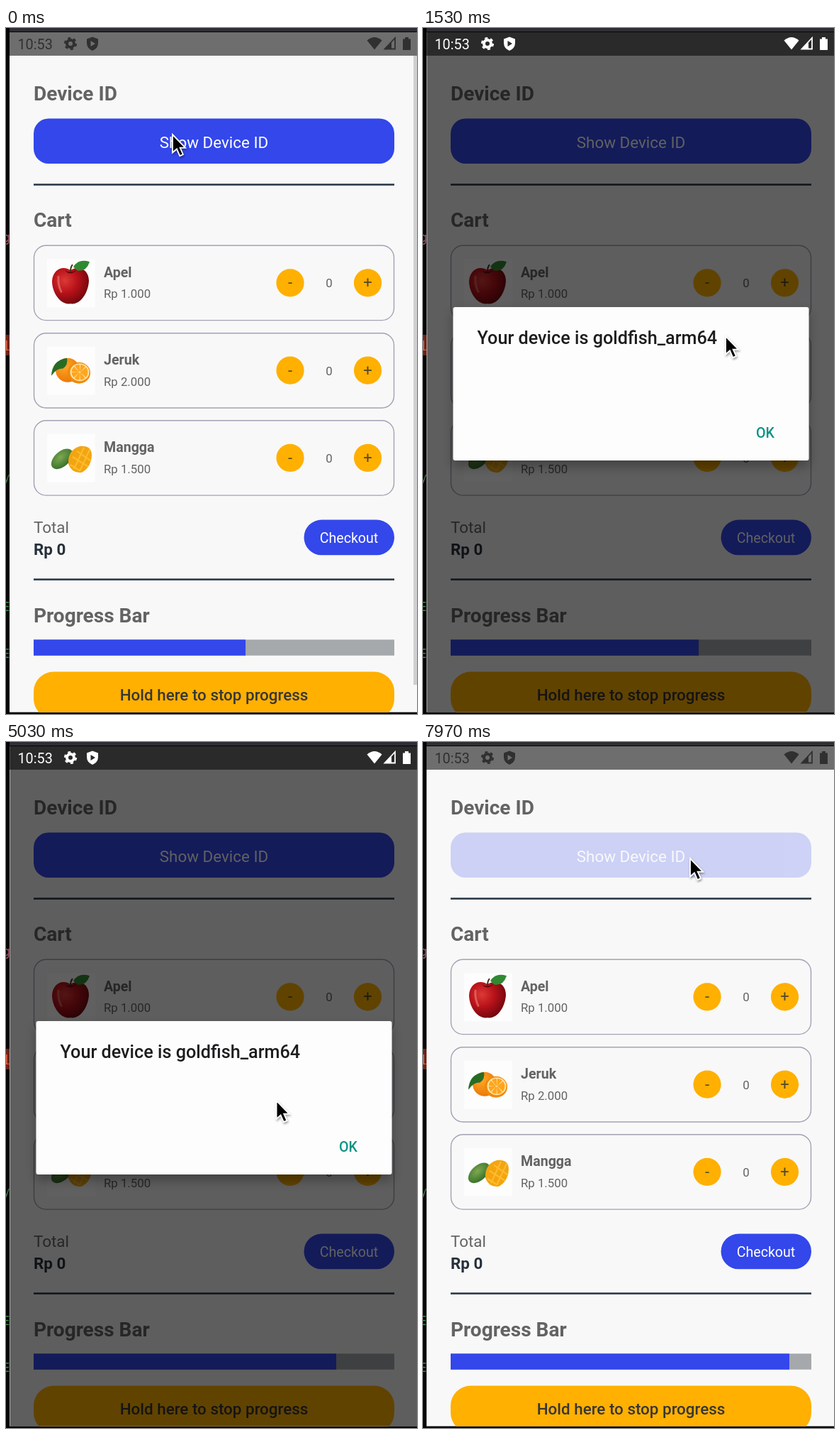
Write an HTML page that moves like this. It is 580 px wide and 966 px high and loops after 8 s.

```html
<!DOCTYPE html>
<html lang="id">
<head>
<meta charset="utf-8">
<title>Device and cart</title>
<style>
  html, body { margin: 0; width: 100%; height: 100%; overflow: hidden; background: #000; }
  svg { display: block; width: 100%; height: 100%; }
  text { font-family: Roboto, sans-serif; fill: #636363; white-space: pre; }
</style>
</head>
<body>
<svg id="stage" viewBox="0 0 580 966" preserveAspectRatio="none">
  <defs>
    <radialGradient id="red" cx=".35" cy=".35" r=".75">
      <stop offset="0" stop-color="#dc3a36"/><stop offset=".45" stop-color="#b8121a"/><stop offset="1" stop-color="#65050b"/>
    </radialGradient>
    <radialGradient id="orange" cx=".4" cy=".35" r=".7">
      <stop offset="0" stop-color="#ffa526"/><stop offset="1" stop-color="#e97605"/>
    </radialGradient>
    <radialGradient id="green" cx=".5" cy=".35" r=".7">
      <stop offset="0" stop-color="#7fa851"/><stop offset="1" stop-color="#2f6a26"/>
    </radialGradient>
    <filter id="shadow" x="-10%" y="-10%" width="120%" height="130%">
      <feDropShadow dx="0" dy="8" stdDeviation="8" flood-opacity=".3"/>
    </filter>
    <filter id="softShadow" x="-50%" y="-30%" width="200%" height="180%">
      <feDropShadow dx="1" dy="2" stdDeviation="1.5" flood-opacity=".4"/>
    </filter>
    <clipPath id="screen"><rect x="5" y="6" width="575" height="957.5"/></clipPath>
    <clipPath id="strip"><rect width="5" height="966"/></clipPath>
  </defs>

  <rect width="580" height="966" fill="#050505"/>
  <g id="editor" clip-path="url(#strip)"></g>
  <rect x="5" width="575" height="5" fill="#302e35"/>
  <g clip-path="url(#screen)">
    <rect x="5" y="6" width="575" height="960" fill="#f8f8f8"/>
    <rect x="5" y="6" width="575" height="33" fill="#6e6e6e"/>
    <rect id="scrollbar" x="575" y="39" width="5" height="886" fill="#cfcfd1"/>
    <g id="page"></g>
    <rect id="dim" x="5.500" y="6" width="575" height="960"/>
    <g id="status"></g>
    <g id="dialog">
      <rect x="42.500" y="393" width="502" height="216" rx="3" fill="#fdfdfd" filter="url(#shadow)"/>
    </g>
  </g>
  <path id="cursor" d="M0 0V25.500L6 20.300L10.300 30L14.800 28L10.600 18.600H18Z" stroke="#fff" stroke-width="1.800" filter="url(#softShadow)"/>
</svg>
<script>
const $ = id => document.getElementById(id);
const LOOP = 8000;
const BLUE = '#3347eb', AMBER = '#ffb000';

const label = (text, x, y, size, { weight = 400, fill = '#636363', anchor = 'start' } = {}) =>
  `<text x="${x}" y="${y}" font-size="${size}" font-weight="${weight}" style="fill:${fill}" text-anchor="${anchor}">${text}</text>`;
const box = (x, y, w, h, fill, rx = 0, extra = '') =>
  `<rect x="${x}" y="${y}" width="${w}" height="${h}" rx="${rx}" fill="${fill}" ${extra}/>`;
const heading = (text, y) => label(text, 39, y, 28, { weight: 700 });
const divider = y => box(39, y, 509, 2.5, '#263442');
const roundButton = (sign, x, y) =>
  `<circle cx="${x}" cy="${y}" r="19.6" fill="${AMBER}"/>` +
  label(sign, x, y + 7.5, 22, { fill: '#594a2b', anchor: 'middle' });

// Fruit drawings, centred on the picture box
const fruits = {
  apple: `<path d="M-1-18C-12-26-26-19-27-3C-27 14-15 31-1 29C13 31 24 14 25-3C25-19 11-26-1-18Z" fill="url(#red)"/>
    <path d="M-9-18Q-1-13 8-19Q-1-9-9-18" fill="#5d080e"/>
    <path d="M-1-16Q-1-23 2-26" fill="none" stroke="#4a2d18" stroke-width="2"/>
    <path d="M3-23Q11-35 26-30Q21-15 8-18Z" fill="#2f8a32"/>
    <path d="M-18-9Q-19 2-14 12" fill="none" stroke="#ef8078" stroke-width="3" stroke-linecap="round" opacity=".6"/>`,
  orange: `<circle cx="-5" cy="-1" r="17" fill="url(#orange)"/>
    <path d="M-28 7Q-27-15-6-18Q-4-8-12-3Q-20-4-28 7Z" fill="#286c24"/>
    <ellipse cx="11" cy="3" rx="16" ry="15" fill="#f08a0c"/>
    <ellipse cx="12" cy="2" rx="13.500" ry="12.500" fill="#ffe3a0"/>
    <ellipse cx="12" cy="2" rx="6.500" ry="6" fill="none" stroke="#ffa51f" stroke-width="10" stroke-dasharray="4.200 .700"/>`,
  mango: `<ellipse cx="-13" cy="1" rx="18" ry="10.500" transform="rotate(-42 -13 1)" fill="url(#green)"/>
    <path d="M-4 8Q-5-12 13-17Q29-18 29-4Q28 13 15 20Q1 22-4 8Z" fill="#f3a511"/>
    <path d="M2-2L24 12M8-10L28 4M-1 9L13 18M4 15L18-15M12 18L26-12" stroke="#fdbd2e" stroke-width="2"/>`
};

const card = (name, price, fruit, y) =>
  box(39.5, y, 508, 105.3, 'none', 17, 'stroke="#a2a2b6" stroke-width="1.4"') +
  box(58, y + 19, 68, 68, '#fdfdfd') +
  `<g transform="translate(92 ${y + 53})">${fruits[fruit]}</g>` +
  label(name, 138, y + 44.5, 19.6, { weight: 700 }) +
  label(price, 138, y + 74, 16.8) +
  roundButton('-', 401, y + 52.5) +
  label('0', 456, y + 59, 16.8, { anchor: 'middle' }) +
  roundButton('+', 510.5, y + 52.5);

$('page').innerHTML =
  heading('Device ID', 102) +
  '<g id="showButton">' + box(39, 127.5, 509, 63.5, BLUE, 21) +
  label('Show Device ID', 293.5, 168.5, 22.4, { fill: '#fff', anchor: 'middle' }) + '</g>' +
  divider(219.3) +
  heading('Cart', 280) +
  card('Apel', 'Rp 1.000', 'apple', 306.3) +
  card('Jeruk', 'Rp 2.000', 'orange', 429.7) +
  card('Mangga', 'Rp 1.500', 'mango', 552.8) +
  label('Total', 39, 711, 22.4) +
  label('Rp 0', 39, 741.5, 22.4, { weight: 700, fill: '#263039' }) +
  box(420.5, 692.5, 127.5, 49.8, BLUE, 24.9) +
  label('Checkout', 484, 725, 19.6, { fill: '#fff', anchor: 'middle' }) +
  divider(775.3) +
  heading('Progress Bar', 836.5) +
  box(39, 861.3, 509, 22.4, '#a6a9ab') +
  box(39, 861.3, 0, 22.4, BLUE, 0, 'id="progress"') +
  box(39, 906.5, 509, 66, AMBER, 28) +
  label('Hold here to stop progress', 293.5, 947, 22.4, { weight: 500, fill: '#363636', anchor: 'middle' });

$('dialog').innerHTML +=
  label('Your device is goldfish_arm64', 76.5, 444.5, 25.2, { weight: 500, fill: '#1d1d1f' }) +
  label('OK', 483, 577, 19.6, { weight: 500, fill: '#0b9384', anchor: 'middle' });

$('status').innerHTML =
  label('10:53', 16.5, 29.5, 19.8, { fill: 'currentColor' }) +
  `<g fill="none" stroke="currentColor">
    <circle cx="91" cy="22" r="5" stroke-width="4"/>
    <circle cx="91" cy="22" r="7.800" stroke-width="2.600" stroke-dasharray="4.100 4.068"/>
    <path d="M534.500 29.500H549V14Z" stroke-width="1.800"/>
  </g>
  <g fill="currentColor">
    <path fill-rule="evenodd" d="M122 12.500L130 15.500V21Q130 28.500 122 32Q114 28.500 114 21V15.500ZM119.500 18V26L126 22Z"/>
    <path d="M520 30.500L509.500 17.500Q520 8.500 530.500 17.500Z"/>
    <path d="M534 30H544V19Z"/>
    <path d="M560 15.500H563V13H568V15.500H571V31H560Z"/>
  </g>`;

$('editor').innerHTML =
  box(0, 432, 5, 29, '#6b2418') +
  [['g', 301, '#a85a68'], ['l', 454, '#e0603f'], ['y', 639, '#3d7a45'], ['E', 821, '#3f8a48'], ['E', 887, '#3f8a48']]
    .map(([char, y, fill]) => `<text x="-5" y="${y}" font-size="18" style="font-family:'Noto Sans Mono',monospace;fill:${fill}">${char}</text>`).join('');

const clamp = v => Math.max(0, Math.min(1, v));
const ramp = (t, from, to) => clamp((t - from) / (to - from));
const ease = u => u * u * (3 - 2 * u);
const mix = (a, b, u) => a + (b - a) * u;

// Keys are [time, value, value...]
function track(keys, t, curve = u => u) {
  const i = Math.max(1, keys.findIndex(key => key[0] >= t));
  const [a, b] = [keys[i - 1], keys[i]];
  const u = curve(ramp(t, a[0], b[0]));
  return a.slice(1).map((v, k) => mix(v, b[k + 1], u));
}

const progressKeys = [[0, 299], [830, 334], [1530, 350], [4050, 407.5], [6110, 448.5], [6410, 452.5], [7970, 478], [LOOP, 478.5]];
const cursorKeys = [
  [0, 235, 150], [900, 235, 150], [1530, 427, 434], [1800, 427, 434], [4050, 262, 441],
  [4400, 262, 441], [5600, 484, 560], [6010, 484, 560], [6110, 486, 537],
  [6410, 408, 280], [7300, 377, 164], [LOOP, 377, 164]
];
const pressKeys = [[0, 1], [360, 1], [500, .2], [550, .2], [790, 1], [7800, 1], [7950, .23], [LOOP, .2]];

function draw(t) {
  const [x, y] = track(cursorKeys, t, ease);
  $('cursor').setAttribute('transform', `translate(${x} ${y})`);
  $('progress').setAttribute('width', track(progressKeys, t)[0]);
  $('showButton').setAttribute('opacity', track(pressKeys, t)[0]);
  $('scrollbar').setAttribute('opacity', 1 - ramp(t, 50, 350));
  $('dim').setAttribute('opacity', .62 * (ramp(t, 750, 970) - ramp(t, 6280, 6490)));
  $('dialog').setAttribute('opacity', ramp(t, 740, 868) - ramp(t, 6280, 6418));
  const shade = mix(48, 255, ramp(t, 730, 850) - ramp(t, 6280, 6400));
  $('status').style.color = `rgb(${shade},${shade},${shade})`;
}

const start = performance.now();
function tick() {
  draw((performance.now() - start) % LOOP);
  requestAnimationFrame(tick);
}
tick();
</script>
</body>
</html>
```
